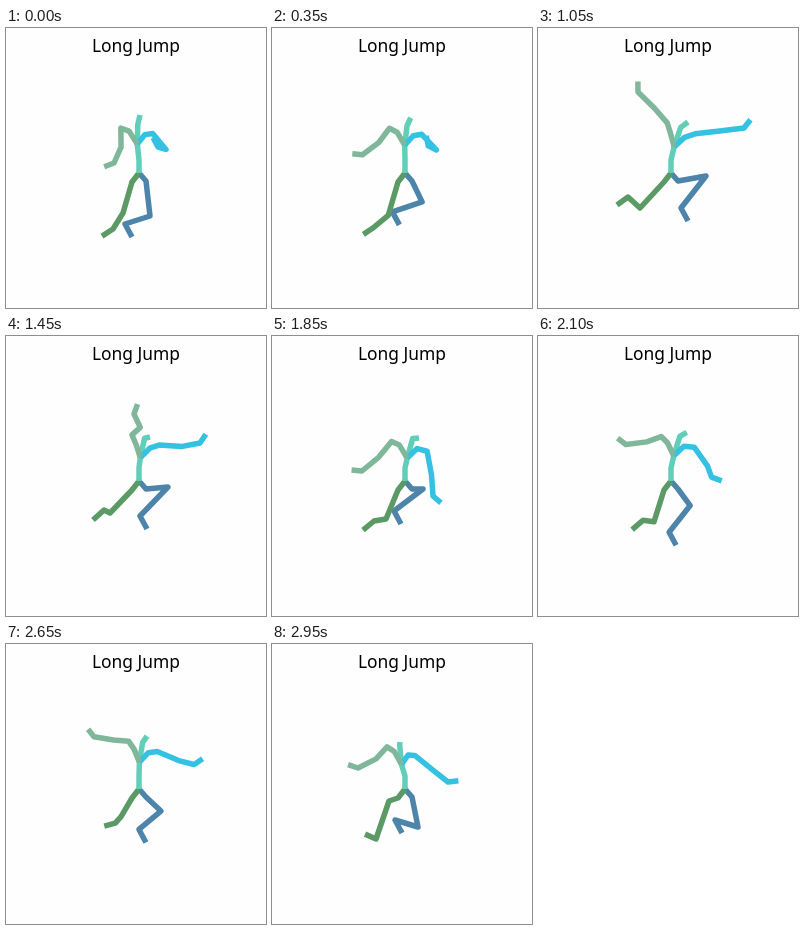
Animation, 260 px wide and 280 px high, one loop 3000 ms. Source, as an HTML page:

```html
<!DOCTYPE html>
<html lang="en">
<head>
<meta charset="utf-8">
<title>Long Jump</title>
<style>
  html, body { margin: 0; width: 100%; height: 100%; overflow: hidden; background: #fefefe; }
  svg { display: block; width: 260px; height: 280px; }
  text { font: 17.4px "Noto Sans", "DejaVu Sans", sans-serif; text-anchor: middle; }
  polyline { fill: none; stroke-width: 5.5; stroke-linejoin: round; }
</style>
</head>
<body>
<svg viewBox="0 0 260 280">
  <text x="130" y="24">Long Jump</text>
  <g id="figure"></g>
</svg>
<script>
const LOOP = 3000, STEP = 50;
const ROOT = [133, 145], WAIST = [133, 132];
const LEFT_HIP = [140, 153], RIGHT_HIP = [126, 154];
const HAND = 10.5, ARM = 50;

// Key poses: time, head, left and right wrist, left knee and ankle, right knee and ankle.
// The remaining joints follow from these.
const poses = [
  [0, [134,87], [152,119], [108,135], [144,188], [119,196], [117,185], [107,201]],
  [650, [143,92], [165,115], [81,114], [156,162], [124,176], [114,188], [98,194]],
  [1050, [150,94], [206,100], [100,64], [168,148], [143,180], [102,180], [90,169]],
  [1450, [144,101], [194,107], [128,78], [162,151], [134,180], [104,177], [98,174]],
  [1850, [147,102], [161,160], [90,135], [151,153], [122,175], [114,183], [102,185]],
  [2150, [149,95], [177,136], [88,102], [153,171], [133,199], [116,186], [106,183]],
  [2400, [150,89], [194,112], [89,75], [160,158], [139,193], [114,184], [112,170]],
  [2950, [128,98], [176,138], [86,124], [146,183], [123,176], [117,157], [104,195]]
];

const add = ([x, y], dx, dy) => [x + dx, y + dy];
const dist = (a, b) => Math.hypot(b[0] - a[0], b[1] - a[1]);

// The shoulder rises with the wrist, the elbow bends as the reach shortens,
// and the hand tilts upwards from the forearm.
function arm(chest, wrist, collarY, shoulderX, shoulderY, bendX, bendY) {
  const rise = chest[1] - wrist[1];
  const shoulder = add(chest, shoulderX, shoulderY - 0.11 * rise);
  const collar = add(chest, shoulderX / 2, collarY);
  const slack = Math.max(0, ARM - dist(shoulder, wrist));
  const elbow = [
    (shoulder[0] + wrist[0]) / 2 + slack * bendX,
    (shoulder[1] + wrist[1]) / 2 + slack * bendY
  ];
  const dx = wrist[0] - elbow[0], dy = wrist[1] - elbow[1];
  const angle = Math.atan2(dy, dx) - Math.sign(dx) * Math.PI / 4;
  const hand = add(wrist, HAND * Math.cos(angle), HAND * Math.sin(angle));
  return [chest, collar, shoulder, elbow, wrist, hand];
}

function buildLimbs([, head, wristL, wristR, kneeL, ankleL, kneeR, ankleR]) {
  const chest = [134 + 0.3 * (head[0] - 143), 118.5 + 0.4 * (head[1] - 93)];
  const lean = head[0] - chest[0];
  const neck = add(chest, 0.55 * lean - 1, -19.5);
  const rise = chest[1] - wristR[1];
  const toeDrop = 10.5 - dist(kneeR, ankleR) ** 2 / 105;
  return [
    [ROOT, LEFT_HIP, kneeL, ankleL, add(ankleL, 7, 13)],
    [ROOT, RIGHT_HIP, kneeR, ankleR, add(ankleR, -11, toeDrop)],
    [ROOT, WAIST, chest, neck, head],
    arm(chest, wristL, -9.5, 14 + 0.5 * lean, -11, 0.3, 0.26),
    arm(chest, wristR, -13, -14 + 0.13 * rise, -18, 0.25, 0.1)
  ];
}

const times = poses.map(pose => pose[0]);
const keys = poses.map(buildLimbs);

// Cubic curve through neighbouring keys; returns one weight per key.
function blend(t) {
  const last = times.length - 1;
  let i = 0;
  while (i < last - 1 && times[i + 1] <= t) i++;
  const before = Math.max(i - 1, 0), after = Math.min(i + 2, last);
  const span = times[i + 1] - times[i], u = (t - times[i]) / span;
  const m0 = u * (1 - u) ** 2 * span / (times[i + 1] - times[before]);
  const m1 = u * u * (u - 1) * span / (times[after] - times[i]);
  const ease = u * u * (3 - 2 * u);
  const weights = times.map(() => 0);
  weights[before] -= m0;
  weights[i] += 1 - ease - m1;
  weights[i + 1] += ease + m0;
  weights[after] += m1;
  return weights;
}

const figure = document.getElementById("figure");
const lines = ["#4d84aa", "#5b9965", "#61ceb9", "#34c1e2", "#80b79a"].map(color => {
  const line = document.createElementNS("http://www.w3.org/2000/svg", "polyline");
  line.setAttribute("stroke", color);
  figure.append(line);
  return line;
});

function draw(t) {
  const weights = blend(t);
  const mix = (limb, joint, axis) =>
    weights.reduce((sum, w, k) => sum + w * keys[k][limb][joint][axis], 0);
  lines.forEach((line, limb) => {
    const points = keys[0][limb].map((_, joint) => [mix(limb, joint, 0), mix(limb, joint, 1)]);
    line.setAttribute("points", points.join(" "));
  });
}

const start = performance.now();
function tick() {
  const t = (performance.now() - start) % LOOP;
  draw(Math.floor(t / STEP) * STEP);
  requestAnimationFrame(tick);
}
tick();
</script>
</body>
</html>
```
